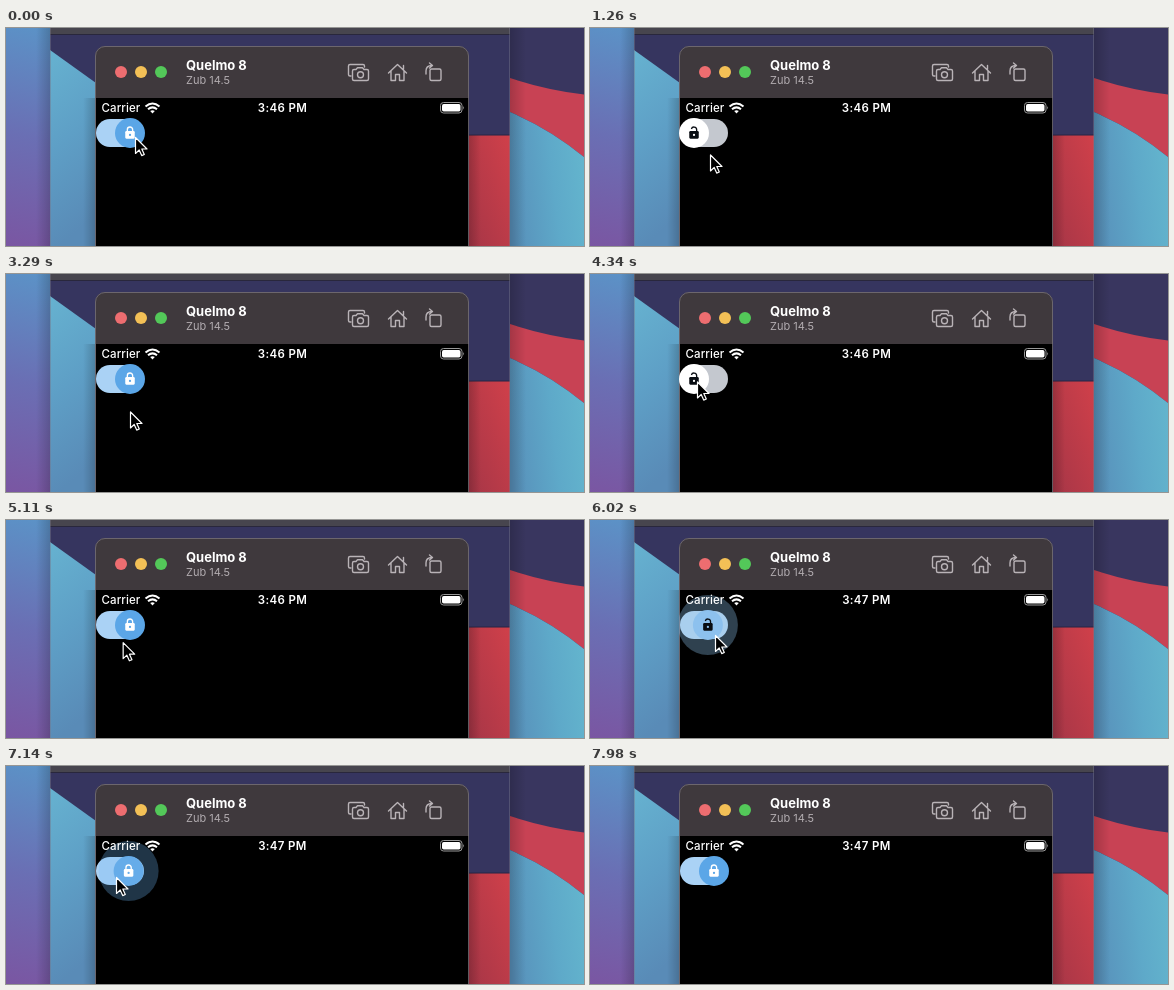
An HTML page for the animation above (8 s loop, 578 by 218 pixels).

```html
<!DOCTYPE html>
<html lang="en">
<head>
<meta charset="utf-8">
<title>Lock switch</title>
<style>
  html, body { margin: 0; width: 100%; height: 100%; overflow: hidden; background: #000; }
  svg { display: block; width: 578px; height: 218px; }
  text { font-family: Inter, Roboto, sans-serif; fill: #fff; }
</style>
</head>
<body>
<svg viewBox="0 0 578 218">
  <defs>
    <linearGradient id="left" gradientUnits="userSpaceOnUse" x1="0" y1="218" x2="50" y2="0">
      <stop offset="0" stop-color="#7a56a2"/><stop offset="0.5" stop-color="#6a6fb4"/><stop offset="1" stop-color="#5b93c7"/>
    </linearGradient>
    <linearGradient id="leftTeal" x1="0" y1="0" x2="0.2" y2="1">
      <stop offset="0" stop-color="#66b2d0"/><stop offset="0.5" stop-color="#5e9fc6"/><stop offset="1" stop-color="#598bb7"/>
    </linearGradient>
    <linearGradient id="rightTeal" x1="0" y1="0.7" x2="1" y2="0.5">
      <stop offset="0" stop-color="#5890ba"/><stop offset="0.6" stop-color="#5ea9c9"/><stop offset="1" stop-color="#63b4cd"/>
    </linearGradient>
    <linearGradient id="red" x1="0" y1="1" x2="1" y2="0">
      <stop offset="0" stop-color="#a63647"/><stop offset="1" stop-color="#d0404a"/>
    </linearGradient>
    <linearGradient id="shade">
      <stop offset="0" stop-color="#000" stop-opacity="0.18"/><stop offset="1" stop-color="#000" stop-opacity="0"/>
    </linearGradient>
    <clipPath id="screen"><rect x="89" y="70" width="374" height="148"/></clipPath>
  </defs>

  <!-- desktop -->
  <rect width="45" height="218" fill="url(#left)"/>
  <g transform="translate(504)">
    <rect width="74" height="218" fill="#39365f"/>
    <path d="M0 50Q36 62 74 66.500V129Q40 101 0 84Z" fill="#c84254"/>
    <path d="M0 84Q40 101 74 129V218H0Z" fill="url(#rightTeal)"/>
    <rect width="16" height="218" fill="url(#shade)"/>
  </g>
  <rect width="14" height="218" transform="matrix(-1 0 0 1 44 0)" fill="url(#shade)"/>

  <!-- back window -->
  <rect x="44" width="460" height="218" fill="#36355f"/>
  <path d="M44 22L90 55V218H44Z" fill="url(#leftTeal)"/>
  <path d="M463 107H504V218H463Z" fill="url(#red)"/>
  <path d="M463 107H504" stroke="#262445"/>
  <rect width="12" height="148" transform="matrix(-1 0 0 1 89 70)" fill="url(#shade)"/>
  <rect x="463" y="107" width="12" height="111" fill="url(#shade)"/>
  <rect x="44" width="460" height="6" fill="#47454e"/>
  <path d="M44 6.500H504" stroke="#29273c"/>
  <path d="M44.500 0V218M503.500 0V218" stroke="#77758a" stroke-opacity="0.45"/>

  <!-- simulator window -->
  <path d="M89 218V28a10 10 0 0 1 10-10H453a10 10 0 0 1 10 10V218Z" fill="#3f393d"/>
  <rect x="90" y="70" width="373" height="148"/>
  <path d="M89.500 218V28a9.500 9.500 0 0 1 9.500-9.500H453a9.500 9.500 0 0 1 9.500 9.500V218" fill="none" stroke="#77727a" stroke-opacity="0.8"/>
  <circle cx="115" cy="44" r="6" fill="#ed6d70"/>
  <circle cx="135" cy="44" r="6" fill="#f3c056"/>
  <circle cx="155" cy="44" r="6" fill="#53c859"/>
  <text x="180" y="42" font-size="13" font-weight="700">Quelmo 8</text>
  <text x="180" y="56" font-size="11" style="fill:#b2acb0">Zub 14.5</text>

  <g fill="none" stroke="#b9b3b7" stroke-width="1.400" stroke-linejoin="round" stroke-linecap="round">
    <path d="M345 48H344a1.500 1.500 0 0 1-1.500-1.500V38a1.500 1.500 0 0 1 1.500-1.500H357a1.500 1.500 0 0 1 1.500 1.500V39"/>
    <path d="M348 41.500H350L351.500 39.800H356.500L358 41.500H361a1.500 1.500 0 0 1 1.500 1.500V51a1.500 1.500 0 0 1-1.500 1.500H348a1.500 1.500 0 0 1-1.500-1.500V43a1.500 1.500 0 0 1 1.500-1.500Z"/>
    <circle cx="354.500" cy="46.800" r="3"/>
    <path d="M382.500 45L391.500 36.500L400.500 45M385 43V52.500H389.500V46.500H393.500V52.500H398V43M397.500 41.500V37.500"/>
    <rect x="424" y="41" width="11" height="11.500" rx="1.500"/>
    <path d="M420 46V43Q420 37.500 426 37.500M423.500 35L426.500 37.500L423.500 40"/>
  </g>

  <!-- switch -->
  <g clip-path="url(#screen)">
    <rect id="track" x="90" y="91" width="48" height="28" rx="14"/>
    <circle id="ripple" cy="105"/>
    <g id="thumb">
      <circle id="knob" r="15"/>
      <g id="lock" transform="scale(0.95)">
        <rect x="-5" y="-2" width="10" height="8" rx="1.200"/>
        <path id="shackle" fill="none" stroke-width="1.400"/>
        <circle id="keyhole" cy="2" r="1.200"/>
      </g>
    </g>
  </g>

  <!-- status bar -->
  <text x="95.500" y="84.300" font-size="11.500" font-weight="500" letter-spacing="0.1">Carrier</text>
  <g fill="none" stroke="#fff" stroke-width="2">
    <path d="M139.500 78.500Q146.500 72.500 153.500 78.500M142 81.300Q146.500 77.500 151 81.300"/>
    <path d="M144.200 83L146.500 85.500L148.800 83Q146.500 81.500 144.200 83Z" fill="#fff" stroke="none"/>
  </g>
  <text id="clock" x="276.500" y="84.300" font-size="11.500" font-weight="600" letter-spacing="0.35" text-anchor="middle"></text>
  <rect x="434.500" y="74.500" width="21.500" height="10.500" rx="3" fill="none" stroke="#999"/>
  <rect x="436" y="76" width="18.500" height="7.500" rx="1.700" fill="#fff"/>
  <path d="M457.200 78q1.800 1.800 0 3.600Z" fill="#999"/>

  <path id="pointer" d="M0 0V16L3.700 12.500L6.200 18.100L8.800 17L6.300 11.500H11.500Z" fill="#000" stroke="#fff" stroke-width="1.200" stroke-linejoin="round"/>
</svg>

<script>
const LOOP = 8000, SLIDE = 200, HOLD = 110, FADE = 400;
const WHITE = [255, 255, 255], BLUE = [91, 166, 231];
// Release times; the switch starts on and flips at each one.
const clicks = [560, 2350, 3800, 4680, 5960, 6955];
// Pointer stops: time, x, y
const stops = [
  [0, 129.5, 109.5], [280, 127, 111], [640, 127, 111], [1260, 120.5, 127], [1700, 117, 128],
  [2150, 108, 109], [2450, 108, 109], [3000, 123, 135], [3290, 124.5, 138],
  [3650, 126, 113], [3900, 126, 113], [4340, 107.5, 108], [4800, 107.5, 108],
  [5250, 120, 127], [5750, 125.5, 115.5], [6100, 125.5, 115.5], [6650, 110.5, 111.5],
  [7200, 110.5, 111.5], [7800, 128, 222], [8000, 128, 222]
];

const $ = id => document.getElementById(id);
const clamp = v => Math.max(0, Math.min(1, v));
const mix = (a, b, k) => a + (b - a) * k;
const mixColor = (a, b, k) => `rgb(${a.map((v, i) => Math.round(mix(v, b[i], k)))})`;
const set = (id, attrs) => {
  for (const name in attrs) $(id).setAttribute(name, attrs[name]);
};

function pointerAt(t) {
  const i = stops.findIndex(stop => stop[0] > t);
  const [t0, x0, y0] = stops[i - 1], [t1, x1, y1] = stops[i];
  const k = (t - t0) / (t1 - t0), ease = k * k * (3 - 2 * k);
  return [mix(x0, x1, ease), mix(y0, y1, ease)];
}

function switchAt(t) {
  const done = clicks.filter(c => c <= t);
  const on = done.length % 2 === 0;
  const slide = done.length ? clamp((t - done.at(-1)) / SLIDE) : 1;
  return { on, value: on ? slide : 1 - slide };
}

function rippleAt(t) {
  const click = clicks.find(c => t >= c - HOLD && t < c + FADE);
  if (click === undefined) return { size: 0, opacity: 0 };
  const fade = clamp((t - click) / FADE);
  return { size: clamp((t - click + HOLD) / HOLD), opacity: 0.32 * (1 - fade ** 3) };
}

function draw(t) {
  const { on, value } = switchAt(t);
  const ripple = rippleAt(t);
  const x = mix(104, 124, value);
  const ink = on ? '#fff' : '#080c12';
  const knob = mixColor(WHITE, BLUE, value);

  set('track', { fill: mixColor([196, 200, 207], [170, 210, 245], value) });
  set('ripple', { cx: x, r: 30 * ripple.size, opacity: ripple.opacity, fill: mixColor(WHITE, [100, 181, 246], value) });
  set('thumb', { transform: `translate(${x} 105)` });
  set('knob', { fill: knob });
  set('lock', { fill: ink });
  set('shackle', { stroke: ink, d: on ? 'M-2.8 -1V-3.5a2.8 2.8 0 0 1 5.6 0V-1' : 'M2.8 -1V-3.5a2.8 2.8 0 0 0-5.5-0.7' });
  set('keyhole', { fill: knob });
  set('pointer', { transform: `translate(${pointerAt(t)})` });
  $('clock').textContent = t < 5200 ? '3:46 PM' : '3:47 PM';
}

const start = performance.now();
function tick() {
  draw((performance.now() - start) % LOOP);
  requestAnimationFrame(tick);
}
tick();
</script>
</body>
</html>
```
